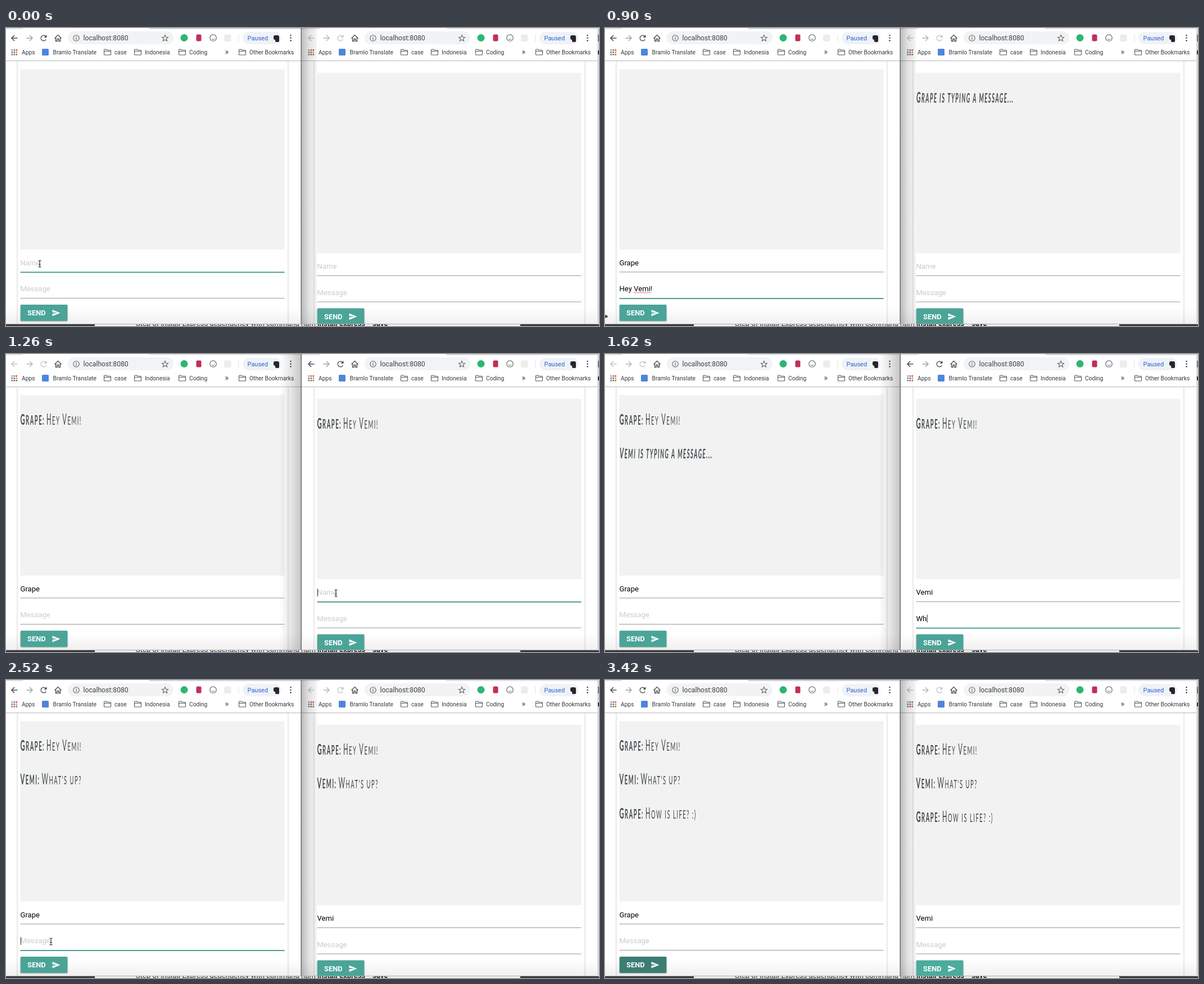
An HTML page with a canvas that plays this animation: 1055x531 px, repeating every 3.6 s.

```html
<!DOCTYPE html>
<html lang="en">
<head>
<meta charset="utf-8">
<title>Two chat windows</title>
<style>
html, body { margin: 0; width: 100%; height: 100%; overflow: hidden; background: #fff; }
canvas { display: block; }
</style>
</head>
<body>
<canvas id="stage" width="1055" height="531"></canvas>
<script>
const ctx = document.getElementById('stage').getContext('2d');
const STEP = 180;
const SANS = 'Roboto, "Open Sans", sans-serif';
const users = ['Grape', 'Vemi'];
const talk = [[0, 'Hey Vemi!'], [1, "What's up?"], [0, 'How is life? :)']];

// Each entry changes only what differs from the moment before it.
const script = [
  { active: 0, names: ['', ''], msgs: ['', ''], focus: 'name', caret: false,
    sent: 0, typing: -1, pressed: -1, light: -1, wavy: false, mouse: ['beam', 60, 420] },
  { names: ['Gra', ''], caret: true, mouse: null },
  { names: [users[0], ''], focus: 'msg' },
  { msgs: ['Hey ', ''], typing: 0 },
  { msgs: ['Hey Ve', ''] },
  { msgs: [talk[0][1], ''], caret: false, wavy: true, mouse: ['resize', 1, 514] },
  { msgs: ['', ''], sent: 1, typing: -1, pressed: 0, focus: '', wavy: false, mouse: null },
  { active: 1, pressed: -1, focus: 'name', caret: true, mouse: ['beam', 587, 426] },
  { names: [users[0], 'Vem'], mouse: null },
  { names: users, focus: 'msg', msgs: ['', 'Wh'], typing: 1 },
  { msgs: ['', 'What'] },
  { msgs: ['', "What's"] },
  { msgs: ['', talk[1][1]] },
  { msgs: ['', ''], sent: 2, typing: -1, pressed: 1, light: 0, focus: '', mouse: ['arrow', 101, 426] },
  { active: 0, pressed: -1, light: -1, focus: 'msg', mouse: ['beam', 80, 466] },
  { msgs: ['Ho', ''], typing: 0, mouse: null },
  { msgs: ['How is', ''] },
  { msgs: [talk[2][1], ''] },
  { msgs: ['', ''], sent: 3, typing: -1, pressed: 0, focus: '' },
  { light: 1 }
];
let last = {};
const states = script.map(change => last = { ...last, ...change });

function rect(x, y, w, h, color) {
  ctx.fillStyle = color;
  ctx.fillRect(x, y, w, h);
}
function pill(x, y, w, h, r, color) {
  ctx.fillStyle = color;
  ctx.beginPath();
  ctx.roundRect(x, y, w, h, r);
  ctx.fill();
}
function dot(x, y, r, color) {
  ctx.fillStyle = color;
  ctx.beginPath();
  ctx.arc(x, y, r, 0, 7);
  ctx.fill();
}
function ring(x, y, r, color, from = 0, to = 7, width = 1.2) {
  ctx.strokeStyle = color;
  ctx.lineWidth = width;
  ctx.beginPath();
  ctx.arc(x, y, r, from, to);
  ctx.stroke();
}
function draw(d, x, y, color, width = 0) {
  ctx.save();
  ctx.translate(x, y);
  const path = new Path2D(d);
  if (width) {
    ctx.strokeStyle = color;
    ctx.lineWidth = width;
    ctx.stroke(path);
  } else {
    ctx.fillStyle = color;
    ctx.fill(path);
  }
  ctx.restore();
}
function text(s, x, y, size, color, weight = 400) {
  ctx.font = `${weight} ${size}px ${SANS}`;
  ctx.fillStyle = color;
  ctx.fillText(s, x, y);
  return ctx.measureText(s).width;
}

// Narrow capitals: real capitals are a little taller than the rest.
function narrow(s, x, y, style) {
  const condense = 0.43;
  ctx.save();
  ctx.translate(x, y);
  ctx.scale(condense, 1);
  ctx.letterSpacing = '3.5px';
  ctx.fillStyle = '#41494d';
  let at = 0;
  for (const run of s.match(/[A-Z]|[^A-Z]+/g)) {
    ctx.font = `${style} ${/[A-Z]/.test(run) ? 26 : 22}px Lato, sans-serif`;
    ctx.fillText(run.toUpperCase(), at, 0);
    at += ctx.measureText(run.toUpperCase()).width;
  }
  ctx.restore();
  return at * condense;
}

function folder(x) {
  draw('M.5 9.5V1.5Q.5.5 1.5.5H4.5L6 2H11.5Q12.5 2 12.5 3V9.5Q12.5 10.5 11.5 10.5H1.5Q.5 10.5.5 9.5ZM.5 4H12.5', x, 37.5, '#55595d', 1.1);
}

function toolbar(on) {
  const ink = '#4b4f53', pale = '#c3c5c8', lit = on ? ink : pale;
  rect(-2, 0, 528, 58, '#fff');
  rect(-2, 0, 32, 2, '#dfe1e5');
  rect(255, 0, 270, 2, on ? '#d3d6da' : '#e3e5e8');

  draw('M11.5 0H1M6 -5L1 0L6 5', 9, 18, lit, 1.6);
  draw('M0 0H10.5M5.5 -5L10.5 0L5.5 5', 36.5, 18, on ? '#9da0a4' : '#b3b5b8', 1.4);
  ring(67, 18, 4.8, lit, 0.5, 5.5, 1.5);
  draw('M5.5 -6V-1H.5Z', 67, 18, lit);
  draw('M-6 .5L0 -5.5L6 .5M-4 -1V5.5H-1.3V1.5H1.3V5.5H4V-1', 92.5, 18, ink, 1.4);

  pill(110, 6, 188, 23, 11.5, '#f1f3f4');
  ring(125, 18, 5.2, '#5f6368', 0, 7, 1.1);
  rect(124.4, 17, 1.2, 4, '#5f6368');
  rect(124.4, 14.8, 1.2, 1.3, '#5f6368');
  text('localhost:8080', 137.5, 22, 12.2, '#3f4246');
  draw('M0 -5.5L1.6 -1.8L5.5 -1.5L2.5 1.1L3.5 5L0 2.9L-3.5 5L-2.5 1.1L-5.5 -1.5L-1.6 -1.8Z', 283, 18, '#5f6368', 1.1);

  dot(317, 17.5, 6.5, '#2bb673');
  pill(338.5, 11.5, 9, 12, 2, '#c22f56');
  ring(368.5, 17.5, 5.7, '#5a5d61', 0, 7, 1.1);
  draw('M-2.5 2Q0 4 2.5 2', 368.5, 17.5, '#5a5d61', 1);
  pill(388, 11.5, 12.5, 12.5, 2, '#ededee');
  rect(413.5, 11, 1, 14, '#e1e3e5');
  pill(421, 7, 69, 22, 11, '#eff2f8');
  text('Paused', 429.5, 22, 11, '#2d62c9');
  pill(476, 13, 10, 8, 3, '#26262a');
  pill(479, 18, 7, 7, 2, '#26262a');
  for (const y of [13, 17.7, 22.4]) dot(506.5, y, 1.3, ink);

  const tints = ['#d8473b', '#e58a3a', '#3f9b57', '#4a7fe0', '#d8473b'];
  for (let i = 0; i < 9; i++)
    rect(9.5 + i % 3 * 4, 38 + Math.floor(i / 3) * 4, 2.6, 2.6, tints[(i * 2 + 1) % 5]);
  pill(64, 37, 12, 12, 1.5, '#4c86dd');
  const marks = [['Apps', 28], ['Bramlo Translate', 83.5], ['case', 193], ['Indonesia', 247],
    ['Coding', 326], ['»', 389.5], ['Other Bookmarks', 433]];
  for (const [s, x] of marks) text(s, x, 47, s === '»' ? 14 : 10.25, '#36393c');
  [174, 228, 307, 414].forEach(folder);
  rect(-2, 58, 528, 1, '#b4b6b8');
}

function field(value, hint, base, y, focused, caret, wavy) {
  let end = 25.5;
  if (value) end += text(value, 25.5, base, 13.1, '#000');
  else text(hint, 25.5, base, 13.1, '#cbcbcb');
  if (wavy) {
    const from = 25.5 + ctx.measureText('Hey ').width;
    for (let x = from; x < end - 3; x += 2.6)
      rect(x, base + 1.5 + Math.round((x - from) / 2.6) % 2 * 0.8, 1.6, 1.4, '#e0506c');
  }
  if (focused) rect(25.5, y - 1, 470, 2, '#4a9f94');
  else rect(25.5, y - 1, 470, 1, '#969696');
  if (focused && caret) rect(end + 0.3, base - 11, 1, 14, '#222');
}

function button(color) {
  ctx.save();
  ctx.shadowColor = 'rgba(0,0,0,.28)';
  ctx.shadowBlur = 2.5;
  ctx.shadowOffsetY = 1;
  pill(25.8, 493, 83.6, 29, 1.5, color);
  ctx.restore();
  text('SEND', 38, 512, 12.9, '#fff', 700);
  draw('M0 0L14 5.7L0 11.4V7L9.5 5.7L0 4.4Z', 82.5, 502, '#fff');
}

function page(side, s) {
  const on = s.active === side;
  rect(-2, 59, 528, 469, '#fff');
  for (const x of [19.5, 501.5]) {
    rect(x - 1, 59, 3, 469, 'rgba(0,0,0,.035)');
    rect(x, 59, 1, 469, 'rgba(0,0,0,.08)');
  }
  const fade = ctx.createLinearGradient(0, 498, 0, 528);
  fade.addColorStop(0, 'rgba(0,0,0,0)');
  fade.addColorStop(1, 'rgba(0,0,0,.06)');
  rect(-2, 498, 528, 30, fade);

  ctx.translate(0, side * 6.5);
  rect(25.5, 73.3, 470, 321.4, '#f2f2f2');
  let y = 126;
  for (const [who, line] of talk.slice(0, s.sent)) {
    const w = narrow(users[who] + ':', 25.5, y, '700');
    narrow(line, 25.5 + w + 3, y, '400');
    y += 60.4;
  }
  if (s.typing === 1 - side) narrow(users[s.typing] + ' is typing a message...', 26, y, 'italic 700');

  const focus = on ? s.focus : '';
  field(s.names[side], 'Name', 422.5, 435.3, focus === 'name', s.caret);
  field(s.msgs[side], 'Message', 469, 482, focus === 'msg', s.caret, s.wavy && on);
  button(s.pressed === side ? '#3b7d73' : s.light === side ? '#4bab9c' : '#4aa497');
}

function pane(side, s) {
  ctx.save();
  ctx.beginPath();
  ctx.rect(side ? 526 : 0, 0, side ? 526 : 525, 528);
  ctx.clip();
  ctx.translate(side * 528, 0);
  toolbar(s.active === side);
  page(side, s);
  ctx.restore();
}

function backdrop() {
  rect(0, 0, 1055, 531, '#d8d9da');
  rect(158, 528, 757, 3, '#f0f0f0');
  rect(0, 528, 158, 3, '#3a3a3c');
  rect(915, 528, 140, 3, '#3a3a3c');
  rect(1053, 12, 2, 12, '#77797b');
  rect(1053, 40, 2, 7, '#333');
  const w = text('Step of install Express dependency with command npm ', 231, 531, 13, '#333');
  const b = text('install express', 231 + w, 531, 13, '#222', 700);
  text(' --save', 231 + w + b, 531, 13, '#222', 700);
}

function edgeShadow(active) {
  const [from, to, dark] = active ? [526, 487, 0.23] : [525, 553, 0.27];
  const g = ctx.createLinearGradient(from, 0, to, 0);
  g.addColorStop(0, `rgba(0,0,0,${dark})`);
  g.addColorStop(0.5, `rgba(0,0,0,${dark * 0.42})`);
  g.addColorStop(1, `rgba(0,0,0,${active ? 0 : 0.045})`);
  rect(Math.min(from, to), 0, Math.abs(to - from), 528, g);
  rect(524.5, 0, 1.5, 528, '#696b6d');
  rect(0, 527, 1052, 1, '#a7a8a9');
}

const pointers = {
  beam: (x, y) => draw('M-2.5 -6Q0 -6 0 -4.5Q0 -6 2.5 -6M0 -5V5M-2.5 6Q0 6 0 4.5Q0 6 2.5 6M-1.5 1.5H1.5', x, y, '#222', 1.1),
  arrow: (x, y) => {
    const d = 'M0 0V12L2.8 9.4L4.7 13.6L6.6 12.7L4.8 8.7H8.4Z';
    draw(d, x, y, '#fff', 1.6);
    draw(d, x, y, '#111');
  },
  resize: (x, y) => draw('M-1 -3H0V3H-1ZM0 -.6H1V-3L4 0L1 3V.6H0Z', x, y, '#111')
};

function frame(now) {
  const s = states[Math.floor(now / STEP) % states.length];
  backdrop();
  pane(0, s);
  pane(1, s);
  edgeShadow(s.active);
  if (s.mouse) {
    const [kind, x, y] = s.mouse;
    pointers[kind](x, y);
  }
}

const start = performance.now();
function tick() {
  frame(performance.now() - start);
  requestAnimationFrame(tick);
}
tick();
</script>
</body>
</html>
```
